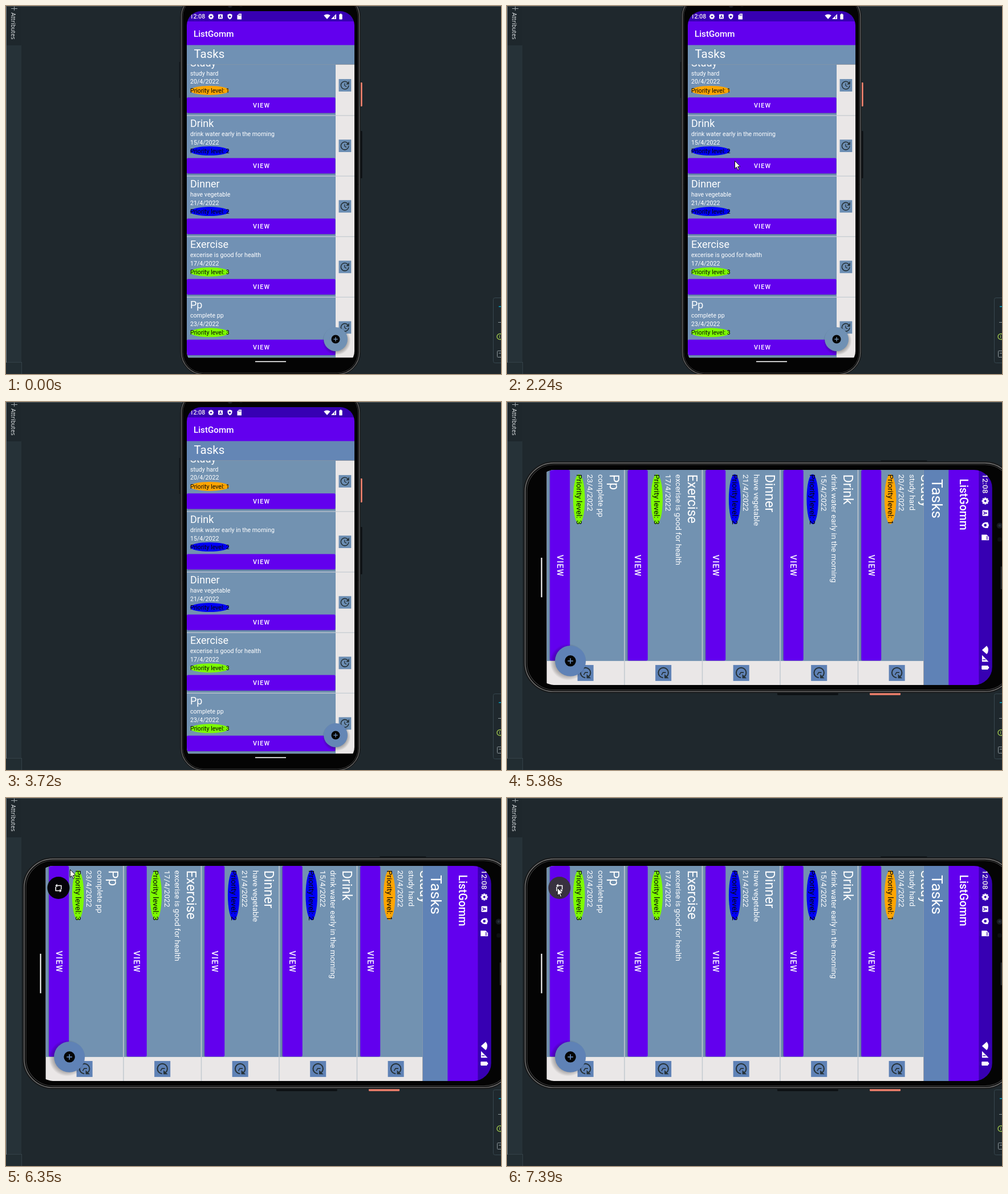
Animation of 868x645 px, one loop 7990 ms. Source, as an HTML page with a canvas:

```html
<!DOCTYPE html>
<html lang="en">
<head>
<meta charset="utf-8">
<title>Task list rotation</title>
<style>
html, body { margin: 0; width: 100%; height: 100%; overflow: hidden; background: #1f282d; }
canvas { display: block; }
</style>
</head>
<body>
<canvas id="stage" width="868" height="645"></canvas>
<script>
const ctx = document.getElementById('stage').getContext('2d');
const LOOP = 7990;
const TURN = 5380;
const INK = '#263238';
const PITCH = 106.1;

const tasks = [
  ['Study', 'study hard', '20/4/2022', 1],
  ['Drink', 'drink water early in the morning', '15/4/2022', 2],
  ['Dinner', 'have vegetable', '21/4/2022', 2],
  ['Exercise', 'excerise is good for health', '17/4/2022', 3],
  ['Pp', 'complete pp', '23/4/2022', 3]
];
const levelColor = { 1: '#ffa500', 2: '#0000f5', 3: '#7cfc00' };

// Pointer keys: time, then tip x and y (none while hidden).
const pointer = [
  [0], [880, 293, 225], [1040],
  [2240, 399, 271], [2370, 487, 386], [2500, 546, 464], [2650, 576, 547],
  [2800, 575, 562], [2920, 574, 575], [3460, 487, 300], [3580, 96, 61], [3720],
  [6060, 220, 42], [6180, 133, 115], [6350, 112, 125], [6470, 98, 152],
  [6590, 86, 173], [6990, 87, 165], [7110, 88, 157]
];
const iconTurn = [[0, -90], [6060, -45], [6180, 0]];

const latest = (keys, t) => keys.filter(k => k[0] <= t).pop();

function rect(x, y, w, h, color) {
  ctx.fillStyle = color;
  ctx.fillRect(x, y, w, h);
}

function round(x, y, w, h, r, fill, stroke, width = 1) {
  ctx.beginPath();
  ctx.roundRect(x, y, w, h, r);
  if (fill) { ctx.fillStyle = fill; ctx.fill(); }
  if (stroke) { ctx.strokeStyle = stroke; ctx.lineWidth = width; ctx.stroke(); }
}

function disc(x, y, rx, color, ry = rx) {
  ctx.beginPath();
  ctx.ellipse(x, y, rx, ry, 0, 0, Math.PI * 2);
  ctx.fillStyle = color;
  ctx.fill();
}

function poly(points, fill, stroke) {
  ctx.beginPath();
  points.forEach(([x, y]) => ctx.lineTo(x, y));
  ctx.closePath();
  ctx.fillStyle = fill;
  ctx.fill();
  if (stroke) { ctx.strokeStyle = stroke; ctx.lineWidth = 1; ctx.stroke(); }
}

function line(points, color, width) {
  ctx.beginPath();
  points.forEach(([x, y]) => ctx.lineTo(x, y));
  ctx.strokeStyle = color;
  ctx.lineWidth = width;
  ctx.stroke();
}

function text(str, x, y, size, color = '#fff', weight = 400) {
  ctx.font = `${weight} ${size}px Roboto, sans-serif`;
  ctx.fillStyle = color;
  ctx.fillText(str, x, y);
}

function at(x, y, draw, angle = 0) {
  ctx.save();
  ctx.translate(x, y);
  ctx.rotate(angle);
  draw();
  ctx.restore();
}

function drawWorkspace() {
  rect(0, 0, 868, 645, '#1f282d');
  rect(0, 0, 27, 645, INK);
  rect(0, 0, 27, 69, '#1e272c');
  rect(0, 625, 27, 20, '#222d32');
  rect(1, 624, 27, 1, '#344147');
  rect(27, 624, 1, 21, '#344147');
  rect(0, 0, 1, 625, '#7e8588');
  rect(0, 0, 868, 1, '#50585c');
  line([[9, 4.5], [20, 4.5]], '#9ea7aa', 1);
  line([[14.5, 1], [14.5, 8]], '#9ea7aa', 1);
  at(9, 11.5, () => {
    ctx.font = '10.2px "Open Sans", sans-serif';
    ctx.fillStyle = '#e4e8ea';
    ctx.fillText('Attributes', 0, 0);
  }, Math.PI / 2);
  round(854.5, 511.5, 30, 114, 3, '#1f282d', '#37474f');
  rect(864, 526, 4, 1.5, '#00a5c8');
  rect(863, 554, 5, 1, '#8d979b');
  ctx.beginPath();
  ctx.arc(866, 579.5, 5, 0, Math.PI * 2);
  ctx.strokeStyle = '#93b84a';
  ctx.lineWidth = 1.5;
  ctx.stroke();
  rect(865, 577, 1, 5, '#93b84a');
  round(861.5, 604.5, 12, 11, 1, null, '#8d979b');
  rect(864, 608, 4, 1, '#8d979b');
}

function drawBody() {
  rect(303.8, 98, 2.2, 63, '#11161a');
  round(620.8, 219, 3.8, 83, 1, '#0c1013');
  round(621.3, 134, 3.4, 42, 1, '#f0806c');
  round(305.8, -22, 315.7, 669.5, 41, '#1c1c1c', '#191c1e');
  round(307.6, -20, 312.1, 665.6, 39, '#060606', '#767676', 1.1);
  round(309.8, -18, 307.7, 661.2, 37, '#040404', '#3c3c3c', 0.9);
  disc(393, -1, 4, '#171a1f');
  disc(393, -1, 1.7, '#27303c');
  disc(412, -1, 3, '#0d0f12');
  rect(449, -5, 31, 2.5, '#25282a');
  rect(437, 622.5, 54, 1.6, '#fff');
}

function drawStatusBar() {
  rect(317, 9, 294, 18, '#3700b3');
  text('12:08', 322.5, 22.2, 10.6, '#eee', 500);
  ctx.save();
  ctx.translate(0.5, 0.5);
  at(359, 18, () => {
    for (let i = 0; i < 4; i++) {
      rect(-1.2, -4.7, 2.4, 9.4, '#fff');
      ctx.rotate(Math.PI / 4);
    }
    disc(0, 0, 3.4, '#fff');
    disc(0, 0, 1.5, '#3700b3');
  });
  round(371.5, 14, 8, 8, 1, '#fff');
  text('A', 373.2, 20.7, 6.8, '#3700b3', 700);
  poly([[392, 13], [396, 14.6], [396, 18], [394.8, 21], [392, 23], [389.2, 21], [388, 18], [388, 14.6]], '#fff');
  disc(392, 18, 1.8, '#3700b3');
  poly([[408, 13], [412.5, 13], [412.5, 23], [405, 23], [405, 16]], '#fff');
  for (let i = 0; i < 3; i++) rect(407.3 + i * 1.6, 14.3, 0.8, 2.4, '#3700b3');
  ctx.beginPath();
  ctx.moveTo(562.5, 22.5);
  ctx.arc(562.5, 22.5, 8.6, -Math.PI * 0.73, -Math.PI * 0.27);
  ctx.fillStyle = '#fff';
  ctx.fill();
  poly([[569.5, 22.5], [578.5, 13.5], [578.5, 22.5]], '#fff');
  rect(575.3, 17.5, 1, 4, '#3700b3');
  round(583.8, 14, 5.4, 9, 0.8, '#fff');
  rect(585.3, 13, 2.4, 1.5, '#fff');
  ctx.restore();
}

function drawUpdateIcon(x, y, color) {
  rect(x - 10.9, y - 10.9, 21.8, 21.8, color);
  at(x - 0.3, y, () => {
    ctx.beginPath();
    ctx.arc(0, 0, 6.8, 0.05, Math.PI * 1.77);
    ctx.strokeStyle = INK;
    ctx.lineWidth = 1.6;
    ctx.stroke();
    poly([[7.6, -7.4], [7.6, -1.5], [2, -1.5]], INK);
    line([[-0.3, -3.4], [-0.3, 0.5], [3, 2.5]], INK, 1.3);
  });
}

function drawTask([name, note, date, level], top, rowColor, accent) {
  rect(317, top, 261, PITCH, rowColor);
  rect(317, top - 0.6, 294, 1.2, '#c3cad0');
  text(name, 323, top + 20, 18);
  text(note, 323, top + 36, 10.6);
  text(date, 323, top + 50.5, 10.6);
  disc(357, top + 62, 34.2, levelColor[level], 8);
  text('Priority level: ' + level, 323, top + 65.6, 10.6, '#090909');
  round(317.3, top + 75.5, 260.4, 27.4, 2, 'rgba(20,30,60,.2)');
  round(317, top + 74.4, 260.5, 27.2, 2, '#6200ee');
  ctx.letterSpacing = '1.1px';
  text('VIEW', 433, top + 92, 10.8, '#fff', 500);
  ctx.letterSpacing = '0px';
  drawUpdateIcon(594.4, top + 53.1, accent);
}

function drawAddButton(color) {
  const glow = ctx.createRadialGradient(579.5, 587, 17, 579.5, 587, 25);
  glow.addColorStop(0, 'rgba(0,0,0,.32)');
  glow.addColorStop(0.6, 'rgba(0,0,0,.14)');
  glow.addColorStop(1, 'rgba(0,0,0,0)');
  disc(579.5, 587, 25, glow);
  disc(578, 584, 21, color);
  disc(578, 584, 7.6, '#050505');
  rect(574.3, 583.3, 7.4, 1.4, color);
  rect(577.3, 580.3, 1.4, 7.4, color);
}

function drawScreen(t) {
  const settled = t >= 3460;
  const rowColor = settled ? '#7292b1' : '#7191b4';
  const accent = t >= TURN ? '#5f82b6' : settled ? '#6486b5' : '#7091b4';
  ctx.save();
  ctx.beginPath();
  ctx.rect(317, 9, 294, 607.5);
  ctx.clip();
  ctx.beginPath();
  ctx.roundRect(317, 9, 294, 621, 25);
  ctx.clip();
  drawStatusBar();
  rect(317, 27, 294, 42, '#6200ee');
  text('ListGomm', 329, 53.5, 15.2, '#fff', 500);
  rect(317, 68.5, 294, 34, accent);
  text('Tasks', 329.5, 91, 20.5);

  ctx.save();
  ctx.beginPath();
  ctx.rect(317, 102.5, 294, 514);
  ctx.clip();
  rect(317, 102, 294, 515, '#eae7e7');
  tasks.forEach((task, i) =>
    drawTask(task, 85.9 + i * PITCH, rowColor, t >= TURN ? accent : '#6c8eb3'));
  ctx.restore();
  drawAddButton(accent);
  ctx.restore();
}

function drawRotateButton(t) {
  disc(92, 157.5, 19.5, t >= 7390 ? '#38313f' : '#050308');
  at(92, 158, () => {
    for (let i = 0; i < 2; i++) {
      line([[4.8, 2.5], [4.8, -4.6], [-2.5, -4.6]], '#fff', 1.5);
      poly([[-2.2, -7.6], [-5.6, -4.6], [-2.2, -1.6]], '#fff');
      ctx.rotate(Math.PI);
    }
  }, latest(iconTurn, t)[1] * Math.PI / 180);
}

function drawPointer(t) {
  const [, x, y] = latest(pointer, t);
  if (x === undefined) return;
  at(x + 0.5, y + 0.5, () => poly(
    [[0, 0], [0, 13.5], [3, 10.8], [5.4, 16], [7.4, 15], [5.2, 10], [9.3, 9.6]], '#fff', '#111'));
}

function draw(t) {
  drawWorkspace();
  ctx.save();
  if (t >= TURN) ctx.transform(0, 1.283, -1.2865, 0, 862.5, -287.7);
  drawBody();
  drawScreen(t);
  ctx.restore();
  if (t >= 5920) drawRotateButton(t);
  drawPointer(t);
}

const start = performance.now();
function tick() {
  draw((performance.now() - start) % LOOP);
  requestAnimationFrame(tick);
}
tick();
</script>
</body>
</html>
```
